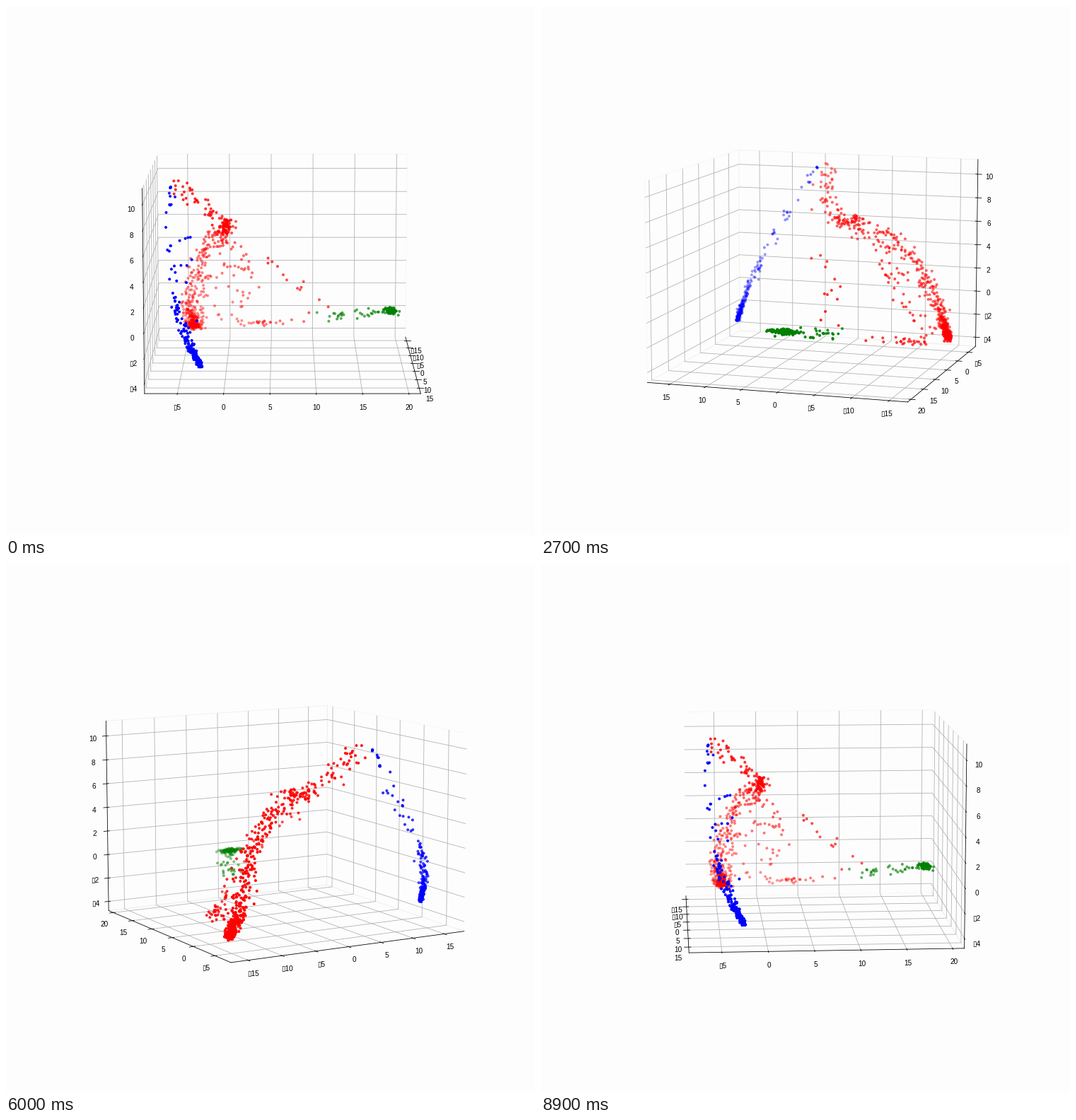
Write a matplotlib script that moves like this. It is 748 by 748 pixels and loops after 9000 ms.

```python
import numpy as np
import matplotlib.pyplot as plt
from matplotlib.animation import FuncAnimation

SIZE, DPI = 748, 72
FRAMES, INTERVAL = 90, 100
BACK = "#fdfdfd"

plt.rcParams["font.family"] = ["Liberation Sans", "DejaVu Sans"]
rng = np.random.default_rng(7)


def curve(*keys):
    """Smooth 3D curve through evenly spaced key points, t from 0 to 1."""
    coefs = np.polyfit(np.linspace(0, 1, len(keys)), keys, len(keys) - 1)
    return lambda t: np.column_stack([np.polyval(c, t) for c in coefs.T])


def jitter(pts, noise):
    return pts + rng.normal(size=pts.shape) * noise


def heap(n, scale, limit):
    """Curve positions piled up at the start and thinning out."""
    return np.minimum(rng.exponential(scale, n), limit)


def red_cloud():
    arc = curve((-15, -4.1, -3.6), (-12.5, -4.25, 0.4), (-8.2, -2, 4.3),
                (-1.4, -0.1, 6.4), (3.3, -4.9, 9.8))
    rim = curve((-13.3, 1.6, -3.1), (-10, 2.5, 0.2), (-5.7, 1.9, 4.9))
    floor = curve((-13.3, 1.6, -3.1), (-10.4, 5.3, -2.6), (-7, 8.7, -2.1))
    branch = curve((1.5, 4.7, 4.3), (-2.8, 7.6, 1.5), (-3, 10.6, -0.3))

    t = heap(290, 0.06, 0.3)
    base = jitter(arc(t), (0.12 + 1.6 * t)[:, None] * (1, 1, 1) + (0, 0.3, 0))
    middle = jitter(arc(rng.uniform(0.1, 0.74, 145)), (0.5, 0.5, 0.45))
    knot = jitter(arc(np.full(42, 0.75)), (1.2, 0.25, 0.25))
    top = jitter(arc(rng.uniform(0.77, 1.03, 48)), (0.8, 0.5, 0.35))

    s, w = rng.uniform(0, 1, 65), rng.uniform(0, 1.05, (65, 1))
    sheet = jitter(arc(0.6 * s) * (1 - w) + rim(s) * w, 0.35)
    edge = jitter(floor(rng.beta(0.6, 1.2, 24)), (0.3, 0.5, 0.12))
    link = jitter(branch(np.linspace(0, 1, 13)), (0.9, 0.6, 0.4))
    return np.vstack([base, middle, knot, top, sheet, edge, link])


def blue_cloud():
    arc = curve((15.9, -2.5, -2.9), (13.3, -5.4, 2.2), (9.1, -6.1, 6.7),
                (5.3, -6.1, 10.25))
    t = heap(165, 0.052, 0.25)
    base = jitter(arc(t), (0.1 + t)[:, None])
    middle = jitter(arc(rng.uniform(0.1, 0.34, 42)), (0.25, 0.3, 0.25))
    top = jitter(arc(rng.uniform(0.34, 0.95, 18)), (0.35, 0.3, 0.25))
    inner = jitter(arc(rng.uniform(0.2, 0.7, 9)) + (0, 1.8, 0), 0.3)
    peak = jitter(arc(np.ones(4)), 0.03)
    return np.vstack([base, middle, top, inner, peak])


def green_cloud():
    arc = curve((-4.6, 10.5, -1.2), (-2.6, 14.5, -1), (0.3, 18.7, -0.35))
    tail = jitter(arc(rng.uniform(0, 1, 36)), (0.8, 0.5, 0.2))
    core = jitter(arc(np.ones(105)), (0.85, 0.3, 0.08))
    return np.vstack([tail, core])


def tick_label(value, _):
    # negative numbers carry an empty box instead of a minus sign
    return ("\u25af" if value < 0 else "") + f"{abs(value):.0f}"


fig = plt.figure(figsize=(SIZE / DPI, SIZE / DPI), dpi=DPI, facecolor=BACK)
ax = fig.add_subplot(projection="3d", facecolor=BACK)

clouds = {"red": red_cloud(), "blue": blue_cloud(), "green": green_cloud()}
points = np.vstack(list(clouds.values()))
colors = np.repeat(list(clouds), [len(c) for c in clouds.values()])
ax.scatter(*points.T, c=colors, marker=".", s=36)

ax.set_xticks(range(-15, 16, 5))
ax.set_yticks(range(-5, 21, 5))
ax.set_zticks(range(-4, 11, 2))
ax.set(xlim=(-17.45, 18.2), ylim=(-8.54, 21.27), zlim=(-4.79, 11.25))
for axis in (ax.xaxis, ax.yaxis, ax.zaxis):
    axis.set_major_formatter(tick_label)
    axis.pane.set_fill(False)


def update(i):
    # the tiny offset keeps the choice of walls stable in edge-on views
    ax.view_init(elev=10, azim=i * 360 / FRAMES + 1e-3)
    return []


anim = FuncAnimation(fig, update, frames=FRAMES, interval=INTERVAL,
                     repeat=True, repeat_delay=0, blit=False)
plt.show()
```
